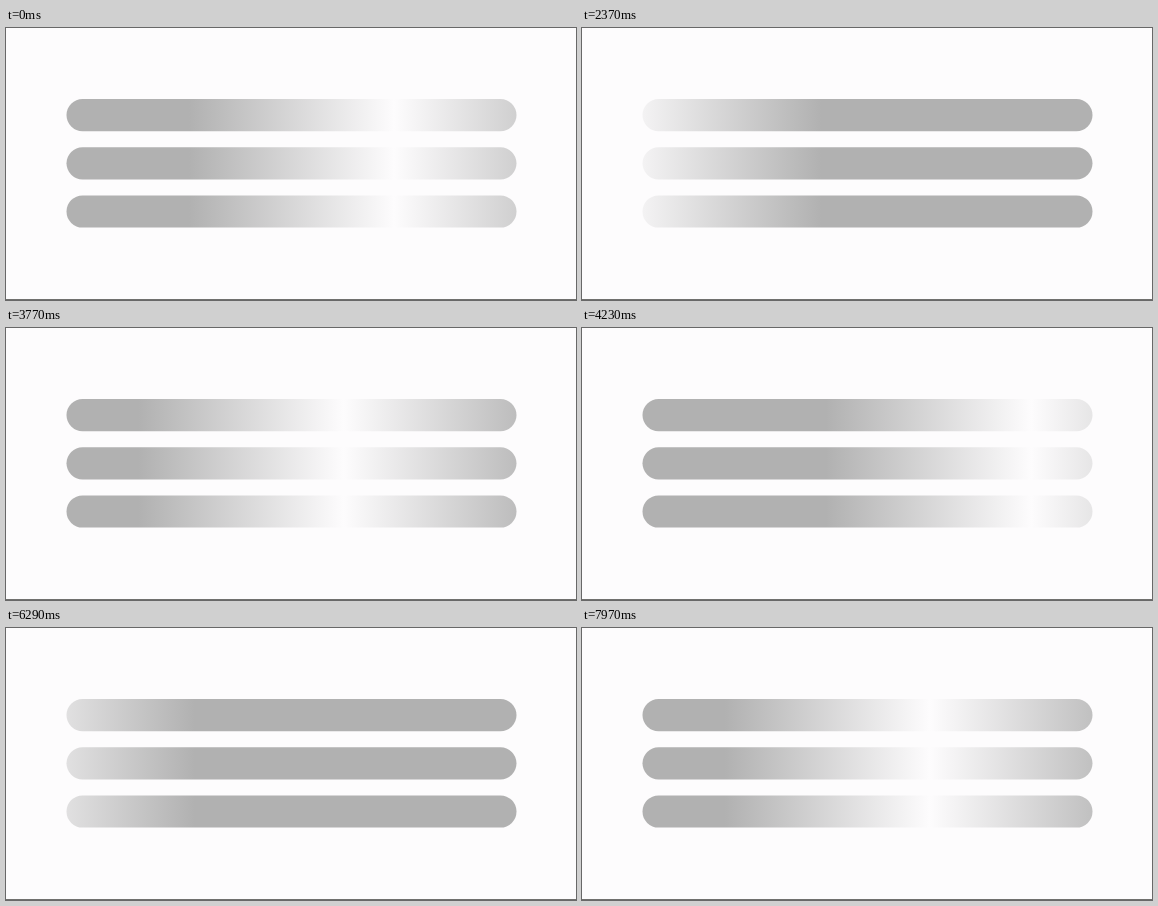
Recreate the animation shown at these times as an HTML page with a canvas. Size 570 px wide and 272 px high, loop 7990 ms.

```html
<!DOCTYPE html>
<html lang="en">
<head>
<meta charset="utf-8">
<title>Loading bars</title>
<style>
  html, body { margin: 0; width: 100%; height: 100%; overflow: hidden; background: #fdfcfd; }
  canvas { display: block; }
</style>
</head>
<body>
<canvas id="stage" width="570" height="272"></canvas>
<script>
const ctx = document.getElementById('stage').getContext('2d');

const LOOP = 7990;
const BAR = { x: 60.5, y: 71, w: 450, h: 32.2, gap: 48.2, count: 3 };
const PAPER = '#fdfcfd';
const GRAY = '#b1b1b1';
const LINE = '#70706e';
const REACH = 205;           // half width of the highlight
const SPAN = 2 * BAR.w;      // distance between two highlights
const SWEEP_STEPS = 89;      // steps per sweep
const START_X = -451;

// The motion advances in bursts of three steps every 140 ms
function stepAt(t) {
  if (t < 20) return -6;
  if (t < 170) return -5;
  const burst = Math.floor((t - 130) / 140);
  const rest = t - 130 - 140 * burst;
  return 3 * burst + Math.min(2, Math.floor(rest / 20));
}

function highlightX(step) {
  const x = START_X + step * SPAN / SWEEP_STEPS;
  const min = BAR.x - BAR.w / 2;
  return min + (((x - min) % SPAN) + SPAN) % SPAN;
}

function shimmer(cx) {
  const fill = ctx.createLinearGradient(cx - REACH, 0, cx + REACH, 0);
  fill.addColorStop(0, GRAY);
  fill.addColorStop(0.5, PAPER);
  fill.addColorStop(1, GRAY);
  return fill;
}

function draw(t) {
  ctx.fillStyle = PAPER;
  ctx.fillRect(0, 0, 570, 272);
  ctx.fillStyle = LINE;
  ctx.fillRect(0, 271, 570, 1);

  ctx.fillStyle = shimmer(highlightX(stepAt(t)));
  for (let i = 0; i < BAR.count; i++) {
    ctx.beginPath();
    ctx.roundRect(BAR.x, BAR.y + i * BAR.gap, BAR.w, BAR.h, BAR.h / 2);
    ctx.fill();
  }
}

const start = performance.now();
function frame() {
  draw((performance.now() - start) % LOOP);
  requestAnimationFrame(frame);
}
frame();
</script>
</body>
</html>
```
